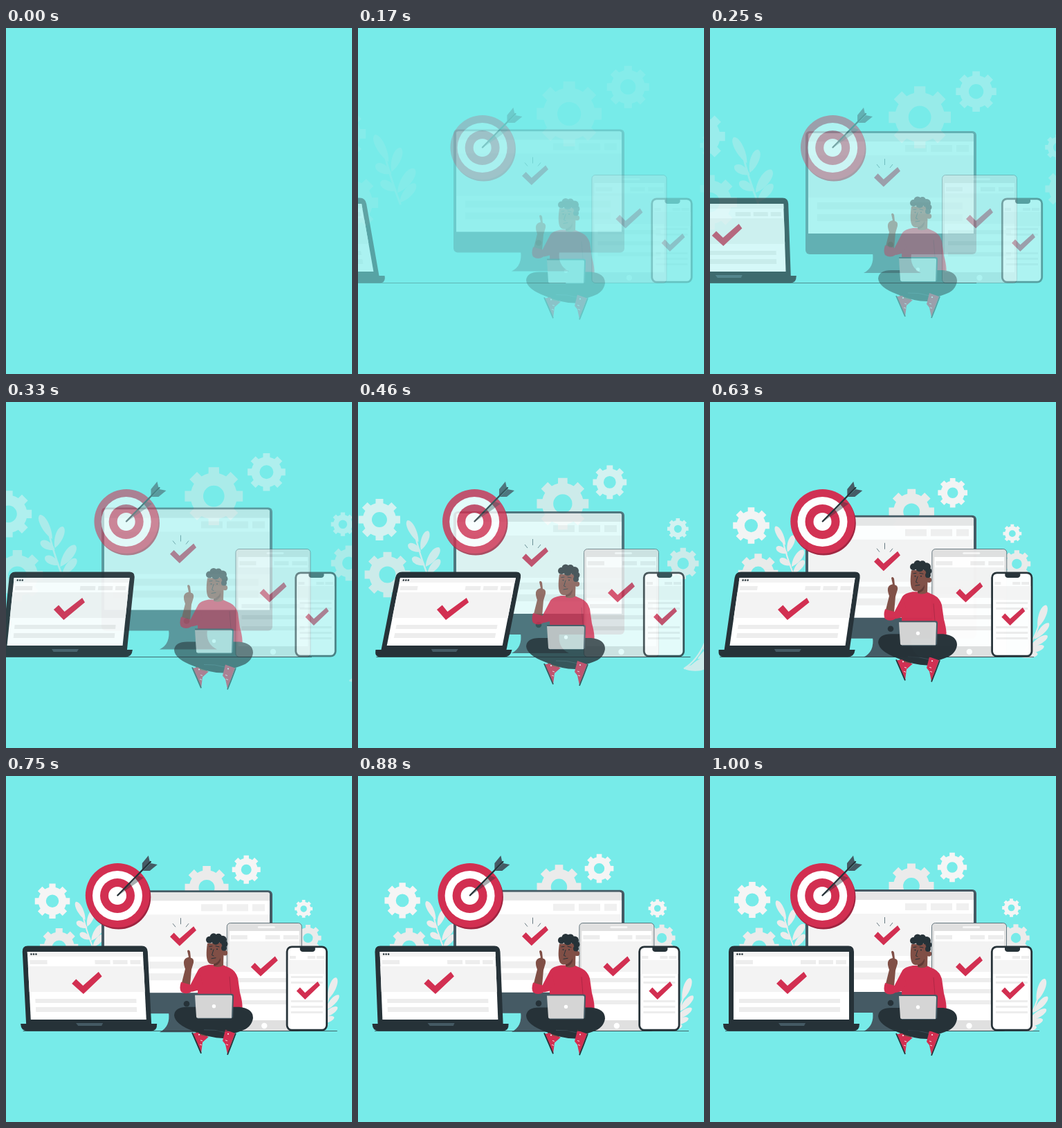
Recreate the animation shown at these times as an HTML page. Size 500x500 px, loop 1.04 s.

```html
<!DOCTYPE html>
<html lang="en">
<head>
<meta charset="utf-8">
<title>Devices</title>
<style>
  html, body { margin: 0; width: 100%; height: 100%; overflow: hidden; background: #77ebe9; }
  svg { display: block; width: 100vw; height: 100vh; }
</style>
</head>
<body>
<svg viewBox="0 0 500 500">
  <g id="backdrop"></g>

  <g id="monitor">
    <path fill="#455a64" d="M235 340H291Q288 361 305 369H222Q238 361 235 340Z"/>
    <rect x="138" y="164" width="247" height="178" rx="6" fill="#455a64"/>
    <path fill="#fff" d="M142 312V170Q142 167 145 167H378Q381 167 381 170V312Z"/>
    <path fill="#e6e6e6" d="M142 179V170Q142 167 145 167H378Q381 167 381 170V179Z"/>
    <path fill="#f4f4f4" d="M142 199H381V260H142Z"/>
    <path fill="#f0f0f0" d="M282 184h31v10h-31zM319 184h31v10h-31zM356 184h18v10h-18zM155 267h210v10h-210zM155 284h210v10h-210z"/>
    <circle cx="261" cy="328" r="4.3" fill="#263238"/>
    <path stroke="#455a64" stroke-width=".8" d="M252.500 204V213M241 212L245 217M264 212L260 217"/>
  </g>

  <g id="tablet">
    <rect x="320.500" y="212.500" width="108" height="156" rx="5" fill="#e0e0e0" stroke="#455a64" stroke-width=".8"/>
    <path fill="#fff" d="M324 224H425V353H324Z"/>
    <path fill="#f3f3f3" d="M324 239H425V283H324Z"/>
    <path fill="#ededed" d="M326 230h24v6h-24zM376 230h21v6h-21zM402 230h22v6h-22zM329 292h91v6h-91zM329 308h91v6h-91zM329 324h91v6h-91z"/>
    <rect x="365" y="217" width="25" height="3" rx="1.500" fill="#f5f5f5"/>
    <circle cx="374.500" cy="361" r="4.200" fill="#fff"/>
  </g>

  <g id="target">
    <circle cx="164" cy="175" r="46.500" fill="#9f2540"/>
    <circle cx="162.500" cy="172.500" r="46.500" fill="#d22f51"/>
    <circle cx="162.200" cy="173" r="36" fill="#fff"/>
    <circle cx="162.200" cy="173" r="25" fill="#d22f51"/>
    <circle cx="162.200" cy="173" r="13" fill="#fff"/>
    <path fill="#263238" opacity=".4" d="M163 173L192 144L200 147L189 155Z"/>
    <path fill="#455a64" d="M198 126L207 115L209 124L198 136ZM199 137L210 126L220 128L209 137Z"/>
    <path stroke="#263238" stroke-width="2.400" stroke-linecap="round" d="M162.500 172.500L210 124"/>
  </g>

  <g id="man">
    <path fill="#d22f51" d="M293 274Q281 276 278 281L268 300Q264 306 269 313L277 311L278 343H330L340 345Q344 335 338 314L335 293Q332 283 324 279L313 274Z"/>
    <path fill="none" stroke="#9f2540" stroke-width=".7" d="M323 291L325 316"/>
    <path fill="#804f46" d="M291 243Q288 263 292 270Q295 274 300 273V276Q307 279 314 275L315 242Z"/>
    <circle cx="316.500" cy="257" r="3.700" fill="#804f46"/>
    <path fill="#5f3935" d="M300 273Q307 271 310 264Q311 273 301 276Z"/>
    <g fill="#263238" id="hair"></g>
    <path fill="none" stroke="#263238" stroke-width="1" stroke-linecap="round" d="M294 247.500L298 247M303 247L308 248M300 252L297.500 260L300 261M297 265L303 264"/>
    <circle cx="296.500" cy="251.500" r="1" fill="#263238"/>
    <circle cx="305" cy="251.500" r="1" fill="#263238"/>
    <path fill="#804f46" d="M262 254Q264 251 266 255L267 264Q272 265 271 271L268 281L266 304L253 304L259 280Q254 267 261 264L264 263Z"/>
    <path fill="#d22f51" d="M253 299L267 303L281 288L284 303L268 313Q260 318 253 313Q250 308 253 299Z"/>
    <path fill="#804f46" d="M274 371L292 375L288 382L276 380ZM316 366L328 370L327 377L315 377Z"/>
    <path fill="#263238" d="M262 335H337Q357 337 357 351Q355 365 339 370L322 376L317 380Q297 381 271 370Q244 360 243 347Q244 335 262 335Z"/>
    <path fill="none" stroke="#455a64" stroke-width=".7" d="M286 368Q301 367 318 372"/>
    <path fill="#d22f51" d="M270 373L278 372L282 376L293 378L284 386L282 402L277 389Z"/>
    <path fill="#d22f51" d="M317 368L331 373L320 403L317 389L313 384Z"/>
    <path fill="none" stroke="#263238" stroke-width="1.800" d="M269 372L276 388L282 402M332 373L326 389L320 404"/>
    <path fill="none" stroke="#fff" stroke-width=".8" d="M281 383L284 384M280 389L283 390M317 383L320 384M318 389L321 390"/>
    <circle cx="279" cy="375" r="1" fill="#fff"/>
    <circle cx="321" cy="374" r="1" fill="#fff"/>
    <path fill="#455a64" d="M273 316H326Q329 316 329 319L328 350L325 352H277Z"/>
    <path fill="#d5d5d5" d="M273 318H325Q327 318 327 320L326 351H277Q275 351 275 349Z"/>
    <circle cx="300.500" cy="334" r="2.700" fill="#fff"/>
  </g>

  <g id="phone">
    <rect x="407.300" y="246.800" width="57.400" height="120.400" rx="7" fill="#fff" stroke="#263238" stroke-width="2.800"/>
    <path fill="#f5f5f5" d="M409 266H463V286H409Z"/>
    <path fill="#ededed" d="M411 260h9v4h-9zM437 260h11v4h-11zM450 260h11v4h-11zM413 289h46v3h-46zM413 297h46v3h-46zM413 324h46v3h-46zM413 332h46v3h-46zM413 340h46v3h-46z"/>
    <path fill="#263238" d="M426 246H448V251Q447 254 444 254H430Q427 254 426 251Z"/>
  </g>

  <g id="laptop">
    <path stroke="#263238" stroke-width=".7" d="M22 368.500H476"/>
    <path fill="#263238" d="M27 359V254Q27 245.500 35 245.500H200Q208 245.500 208 254V359Z"/>
    <path fill="#fff" d="M34 254H201V352H34Z"/>
    <path fill="#f3f3f3" d="M34 254H201V261H34ZM34 275H201V312H34Z"/>
    <path fill="#ededed" d="M37 266h25v6h-25zM131 266h22v6h-22zM157 266h21v6h-21zM182 266h15v6h-15zM42 322h146v6h-146zM42 334h146v7h-146z"/>
    <g fill="#263238">
      <circle cx="39.500" cy="257.500" r="1.300"/><circle cx="43" cy="257.500" r="1.300"/><circle cx="46.500" cy="257.500" r="1.300"/>
      <path d="M19 358H216Q216 368.500 207 368.500H28Q19 368.500 19 358Z"/>
    </g>
    <path fill="#455a64" d="M99 357H138L136 361H102Z"/>
  </g>
</svg>
<script>
const $ = id => document.getElementById(id);
const LOOP = 1040, FRAME = 1000 / 24;

function add(parent, tag, attrs) {
  const el = document.createElementNS('http://www.w3.org/2000/svg', tag);
  for (const name in attrs) el.setAttribute(name, attrs[name]);
  $(parent).append(el);
}

function gear(cx, cy, r, fill) {
  const inner = r * 0.79, hole = r * 0.36;
  const at = (radius, a) => `${cx + radius * Math.cos(a)} ${cy + radius * Math.sin(a)}`;
  let d = '';
  for (let i = 0; i < 8; i++) {
    const a = i * Math.PI / 4 - Math.PI / 2;
    d += i ? `A${inner} ${inner} 0 0 1 ${at(inner, a - 0.23)}` : `M${at(inner, a - 0.23)}`;
    d += `L${at(r, a - 0.18)}L${at(r, a + 0.18)}L${at(inner, a + 0.23)}`;
  }
  d += `A${inner} ${inner} 0 0 1 ${at(inner, -Math.PI / 2 - 0.23)}Z`;
  d += `M${cx - hole} ${cy}a${hole} ${hole} 0 1 0 ${2 * hole} 0a${hole} ${hole} 0 1 0 ${-2 * hole} 0Z`;
  add('backdrop', 'path', { d, fill, 'fill-rule': 'evenodd' });
}

function leaf(x1, y1, x2, y2, width) {
  const dx = x2 - x1, dy = y2 - y1, len = Math.hypot(dx, dy);
  const nx = -dy / len * width, ny = dx / len * width;
  const side = s => `${x1 + dx * 0.35 + s * nx} ${y1 + dy * 0.35 + s * ny} ${x1 + dx * 0.95 + s * nx} ${y1 + dy * 0.95 + s * ny}`;
  const back = s => side(s).split(' ');
  const [a, b, c, e] = back(-1);
  add('backdrop', 'path', { d: `M${x1} ${y1}C${side(1)} ${x2} ${y2}C${c} ${e} ${a} ${b} ${x1} ${y1}Z`, fill: '#ececec' });
}

function check(parent, x, y, w, h) {
  add(parent, 'path', {
    d: 'M0 17L6.500 10.500L16 20L39.500 0L44 6.500L16 32Z', fill: '#d22f51',
    transform: `translate(${x} ${y}) scale(${w / 44} ${h / 32})`
  });
}

const stem = d => add('backdrop', 'path', { d, fill: 'none', stroke: '#ececec', 'stroke-width': 2 });

stem('M105 195Q111 222 122 250');
leaf(110, 207, 96, 180, 6);
leaf(113, 219, 97, 210, 6);
leaf(118, 236, 102, 227, 6);
leaf(113, 217, 122, 193, 6);
leaf(119, 238, 136, 214, 7);
leaf(121, 248, 137, 229, 6);
stem('M443 366Q466 352 475 316');
leaf(472, 325, 484, 293, 7);
leaf(467, 342, 488, 319, 6);
leaf(460, 354, 486, 337, 6);
leaf(452, 362, 481, 352, 6);
leaf(443, 366, 472, 363, 6);

gear(71, 248, 29, '#ebebeb');
gear(61, 179, 26.5, '#f5f5f5');
gear(291, 159, 33, '#ebebeb');
gear(350, 132, 21.5, '#f5f5f5');
gear(435.5, 190.5, 13.5, '#f5f5f5');
gear(442, 234, 20, '#ebebeb');

check('monitor', 237, 216, 38, 28.5);
check('tablet', 355, 260.5, 39, 29);
check('phone', 421, 297, 34, 26);
check('laptop', 96, 283, 44, 32);

for (const [cx, cy, r] of [[294, 238, 5], [300, 234, 5.5], [307, 234, 5], [313, 238, 6], [316, 244, 4.5], [315, 250, 4], [303, 239, 6]])
  add('hair', 'circle', { cx, cy, r });

// Smooth curve through [time, value] points.
function track(...keys) {
  const slope = i => {
    const a = keys[i - 1], b = keys[i + 1];
    return a && b ? (b[1] - a[1]) / (b[0] - a[0]) : 0;
  };
  return t => {
    if (t <= keys[0][0]) return keys[0][1];
    const i = keys.findIndex(k => k[0] > t) - 1;
    if (i < 0) return keys[keys.length - 1][1];
    const [t0, v0] = keys[i], [t1, v1] = keys[i + 1];
    const span = t1 - t0, u = (t - t0) / span, w = 1 - u;
    return w * w * (1 + 2 * u) * v0 + u * u * (3 - 2 * u) * v1
      + span * u * w * (w * slope(i) - u * slope(i + 1));
  };
}

const offset = track([42, 1.22], [160, 1.17], [250, 1], [333, 0.765], [458, 0.4], [542, 0.18], [625, 0.02], [750, -0.08], [1000, 0]);
const fade = track([42, 0], [160, 0.2], [250, 0.4], [333, 0.56], [458, 0.8], [542, 0.9], [667, 1]);
const slide = track([42, -360], [160, -195], [250, -93], [333, -28], [458, 16.5], [542, 9.5], [600, 2], [750, -0.5], [1000, 0]);
const lean = track([42, -45], [160, -22], [250, -4], [333, 12], [458, 23], [542, 22.5], [600, 21], [750, -6], [1000, 0]);
const laptopFade = track([42, 0], [160, 0.36], [250, 0.69], [333, 0.93], [410, 1]);

function place(id, transform, opacity) {
  $(id).setAttribute('transform', transform);
  $(id).setAttribute('opacity', Math.max(0, Math.min(1, opacity)));
}

function draw(ms) {
  const t = Math.min(24, Math.floor((ms % LOOP + 8) / FRAME)) * FRAME;
  const p = offset(t), shift = 15 * p, alpha = fade(t), k = lean(t) / 117;
  place('backdrop', `translate(259 238) scale(${1 + 0.38 * p}) translate(-259 -238)`, alpha ** 1.4);
  place('monitor', `translate(0 ${-shift})`, alpha);
  place('man', `translate(0 ${shift})`, alpha);
  for (const id of ['tablet', 'target', 'phone']) place(id, `translate(${shift} 0)`, alpha);
  place('laptop', `matrix(1 0 ${-k} 1 ${slide(t) + 307 * k} 0)`, laptopFade(t));
}

function tick() {
  draw(performance.now());
  requestAnimationFrame(tick);
}
tick();
</script>
</body>
</html>
```
